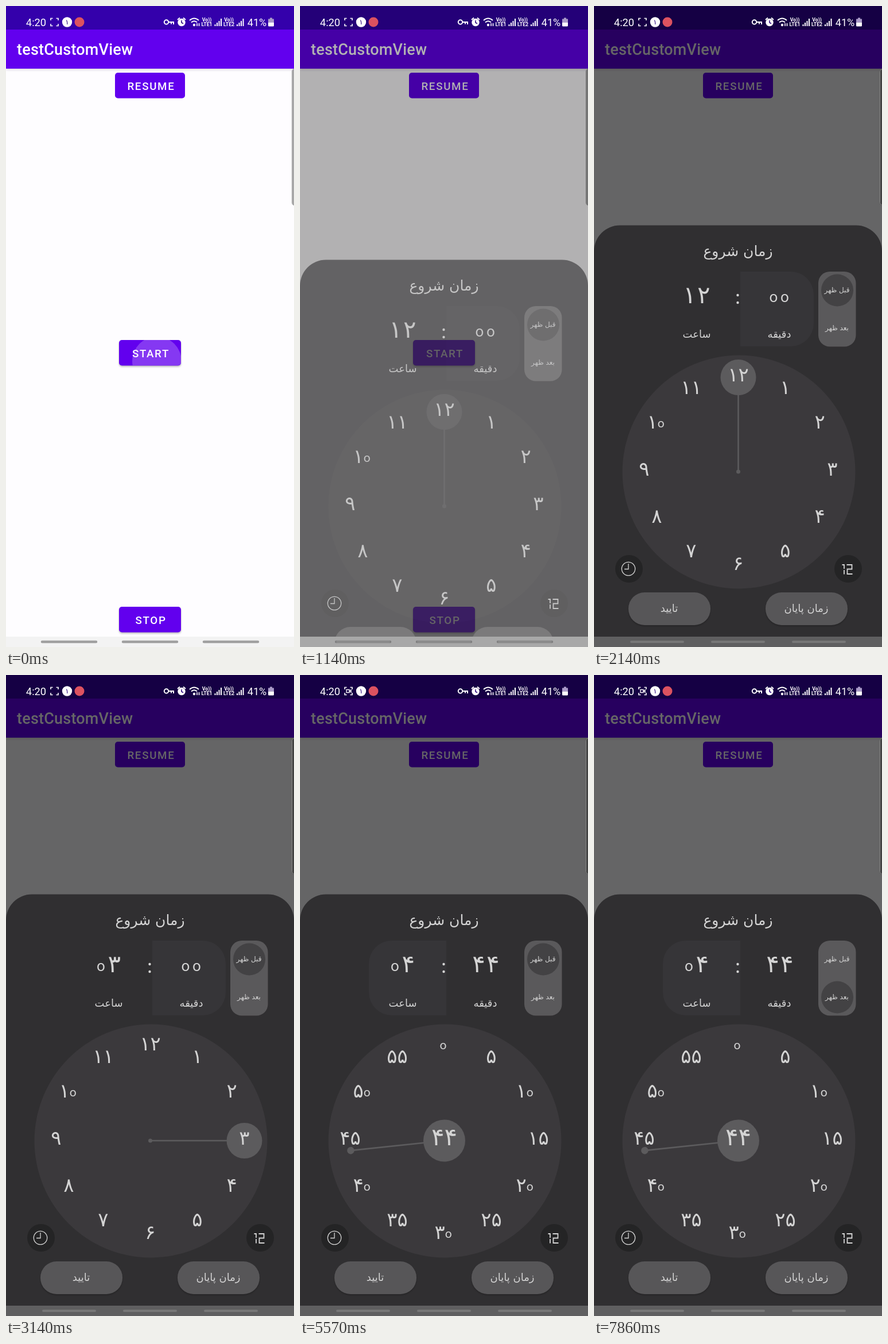
Animation of 502 by 1115 pixels, one loop 8000 ms. Source, as an HTML page:

```html
<!DOCTYPE html>
<html lang="fa">
<head>
<meta charset="utf-8">
<title>Time picker</title>
<style>
  html, body { margin: 0; height: 100%; overflow: hidden; background: #fefdff; }
  svg { display: block; width: 100%; height: 100%; }
  text { font-family: "DejaVu Sans", sans-serif; fill: #d4d4d4; text-anchor: middle; }
  .ui text { font-family: Roboto, sans-serif; font-weight: 500; fill: #fff; }
  .caps { font-size: 18.8px; letter-spacing: .0893em; }
  .btn { fill: #6200ee; }
  .raised { filter: drop-shadow(0 2px 1.5px #0004); }
  .status text { font-family: Roboto, sans-serif; fill: #fff; }
  .status .tiny { font-size: 8.7px; font-weight: 700; }
  .line { fill: none; stroke: #fff; stroke-width: 1.6; }
  .pill { fill: #575658; filter: drop-shadow(0 2px 1px #0003); }
  .face { fill: #3b393c; }
  .pane { fill: #363538; }
  .hand { fill: #5c5b5d; stroke: #5c5b5d; }
  .corner { fill: #242425; }
  .big { font-size: 42px; letter-spacing: .05em; }
  .mid { font-size: 18px; }
  .small { font-size: 12px; }
  #ring text { font-size: 34px; }
  .zero { font-family: Roboto, sans-serif; font-size: .62em; letter-spacing: .18em; baseline-shift: .08em; }
</style>
</head>
<body>
<svg viewBox="0 0 502 1115" preserveAspectRatio="none">
  <defs>
    <clipPath id="startClip"><rect x="197" y="581" width="108" height="44" rx="5"/></clipPath>
    <g id="bars"><path d="M0 35v-3M3.5 35v-6M7 35v-9M10.5 35v-13" stroke="#fff" stroke-width="2"/></g>
  </defs>

  <g class="ui">
    <rect width="502" height="1115" fill="#fefdff"/>
    <rect y="41" width="502" height="68" fill="#6200ee" style="filter:drop-shadow(0 2px 2px #0002)"/>
    <rect width="502" height="41" fill="#3400ab"/>
    <text x="19" y="85" style="text-anchor:start;font-size:27px;letter-spacing:.2px">testCustomView</text>
    <rect class="btn" x="190" y="116" width="122" height="44.5" rx="5"/>
    <text class="caps" x="253" y="146">RESUME</text>
    <rect class="btn raised" x="197" y="581" width="108" height="44.5" rx="5"/>
    <g clip-path="url(#startClip)"><circle id="ripple" cx="263" cy="618" fill="#fff"/></g>
    <text class="caps" x="252.5" y="610.5">START</text>
    <rect class="btn raised" x="197" y="1045" width="108" height="44.5" rx="5"/>
    <text class="caps" x="252.5" y="1075">STOP</text>
    <rect x="498" y="109" width="12" height="238" rx="5" fill="#a9a9a9"/>
  </g>

  <rect id="dim" width="502" height="1115"/>
  <rect id="edge" x="498.5" y="109.5" width="12" height="237" rx="5" fill="#444" stroke="#858585"/>

  <g id="sheet">
    <path d="M0 1400V426.500a45 45 0 0 1 45-45H457a45 45 0 0 1 45 45V1400z" fill="#302f31"/>
    <text x="251" y="435" font-size="25">زمان شروع</text>
    <g id="panels">
      <path id="hourPane" class="pane" d="M255 462H160a40 40 0 0 0-40 40v50a40 40 0 0 0 40 40h95z"/>
      <path id="minutePane" class="pane" d="M255 462h88a40 40 0 0 1 40 40v50a40 40 0 0 1-40 40h-88z"/>
      <circle class="face" cx="252.5" cy="810.5" r="203"/>
      <g id="hand" class="hand">
        <path d="M251.5 810V646" stroke-width="2.6"/>
        <circle id="tip" cx="251.5" cy="646" stroke="none"/>
      </g>
      <circle id="hub" class="hand" cx="251.5" cy="810" style="stroke:none"/>
      <circle class="corner" cx="61" cy="979" r="24"/>
      <circle class="corner" cx="443" cy="979" r="24"/>
    </g>
    <text id="hubText" x="251.5"></text>
    <g id="ring"></g>

    <text id="hour" class="big" x="180" y="517"></text>
    <circle cx="250.5" cy="503" r="2.2" fill="#d4d4d4"/>
    <circle cx="250.5" cy="516" r="2.2" fill="#d4d4d4"/>
    <text id="minute" class="big" x="325" y="517"></text>
    <text class="mid" x="179" y="577">ساعت</text>
    <text class="mid" x="323" y="577">دقیقه</text>

    <rect x="391" y="462" width="65.5" height="130.5" rx="20" fill="#5a595b"/>
    <circle id="thumb" cx="424" r="28" fill="#434244"/>
    <text class="small" x="423.5" y="498">قبل ظهر</text>
    <text class="small" x="423.5" y="563.5">بعد ظهر</text>

    <g fill="none" stroke="#d4d4d4" stroke-width="1.3">
      <circle cx="60" cy="979" r="11.7"/>
      <path d="M60 970v9.5h-7"/>
      <path d="M432.500 972h3.500v7M436 981v7.500M440.500 972h9v7.500h-8v8.500h9" stroke-width="1.8"/>
    </g>

    <rect class="pill" x="60" y="1020" width="143" height="57" rx="28"/>
    <rect class="pill" x="299" y="1020" width="143" height="57" rx="28"/>
    <text class="mid" x="131" y="1054">تایید</text>
    <text class="mid" x="370" y="1054">زمان پایان</text>
  </g>

  <g stroke="#a0a0a0" stroke-width="4.5" stroke-linecap="round">
    <rect y="1097" width="502" height="18" fill="#f3f3f3" stroke="none"/>
    <path d="M63 1106h94M204 1106h94M345 1106h94"/>
  </g>
  <g id="darkNav" stroke="#777" stroke-width="4" stroke-linecap="round">
    <rect y="1097" width="502" height="18" fill="#5f5f60" stroke="none"/>
    <path d="M65 1106h90M206 1106h90M347 1106h90"/>
  </g>

  <g class="status">
    <text x="52.5" y="35" font-size="18.3">4:20</text>
    <path class="line" d="M78 25v-3.5h3.5M87.5 21.5h3.5v3.5M91 31v3.5h-3.5M81.5 34.5h-3.5v-3.5"/>
    <path id="camera" class="line" d="M81 25.5h5v5h-5zM86 28l3-2v4z" style="stroke-width:1.3"/>
    <circle cx="106.5" cy="28" r="8.7" fill="#fff"/>
    <text x="106.5" y="32" font-size="12" style="font-family:'DejaVu Sans',sans-serif;fill:#26007c">۱</text>
    <circle cx="128" cy="28" r="8.5" fill="#dc5260"/>
    <g class="line" style="stroke-width:2">
      <circle cx="279.5" cy="28" r="3.7"/>
      <path d="M283 28h9v4M288 28v3.5"/>
      <path d="M299 24l4-3.5M313 24l-4-3.5"/>
      <path d="M320 25q8-7 16 0M323 28.5q5-4.5 10 0" stroke-width="1.8"/>
    </g>
    <circle cx="306" cy="28.5" r="6.7" fill="#fff"/>
    <path d="M306 25v4l3 1.5" fill="none" stroke="#26007c" stroke-width="1.5"/>
    <circle cx="328" cy="33" r="2.2" fill="#fff"/>
    <path d="M333 30v5M336.5 30v5" class="line"/>
    <text class="tiny" x="350" y="26.5">Vo))</text>
    <text class="tiny" x="350" y="35">LTE1</text>
    <use href="#bars" x="364.5"/>
    <text class="tiny" x="388.5" y="26.5">Vo))</text>
    <text class="tiny" x="388.5" y="35">LTE2</text>
    <use href="#bars" x="403"/>
    <text x="437.5" y="35" font-size="18">41%</text>
    <path d="M457 22.5h3v-2h4v2h3v6h-10z" fill="#a99ac8"/>
    <path d="M457 28.5h10v5.500q0 1.5-1.5 1.5h-7q-1.5 0-1.5-1.5z" fill="#fff"/>
  </g>
</svg>

<script>
const LOOP = 8000, RATE = 7 / 1000;
const $ = id => document.getElementById(id);
const set = (id, attrs) => Object.entries(attrs).forEach(([k, v]) => $(id).setAttribute(k, v));
const clamp = x => Math.max(0, Math.min(1, x));
const smooth = x => (1 - Math.cos(Math.PI * clamp(x))) / 2;
const ramp = (step, from, to) => smooth((step - from) / (to - from));

// Zero is set as a small open ring, the other digits in Persian form.
const persian = (n, pad = 1) => String(n).padStart(pad, '0').replace(/\d/g, d =>
  d === '0' ? '<tspan class="zero">o</tspan>' : String.fromCharCode(0x6f0 + +d));

const numerals = Array.from({ length: 12 }, (_, i) => {
  const label = document.createElementNS('http://www.w3.org/2000/svg', 'text');
  const a = i * Math.PI / 6;
  label.setAttribute('x', 251.5 + 164 * Math.sin(a));
  label.setAttribute('y', 817 - 164 * Math.cos(a));
  $('ring').append(label);
  return label;
});

function drawEntrance(step) {
  const fade = clamp(1 - (step - 2) / 4);
  set('ripple', { r: 43 + 45 * Math.min(step, 2), opacity: 0.22 * fade });

  // The sheet rises and fades in over two steps.
  const alpha = step < 7 ? 0 : step === 7 ? 0.025 : step === 8 ? 0.6 : 1;
  const lift = step <= 7 ? 206 : step === 8 ? 60 : 0;
  const dim = step < 8 ? 0 : step === 8 ? 0.5 : 1;
  set('sheet', { opacity: alpha, transform: `translate(0 ${lift})` });
  set('dim', { opacity: 0.6 * dim });
  set('darkNav', { opacity: dim });
  set('edge', { opacity: step > 9 ? 1 : 0 });
  set('panels', { opacity: clamp(0.6 + (step - 9) * 0.15) });
}

function drawClock(step) {
  const minuteMode = step >= 29;
  const hours = Math.round(4 * ramp(step, 16, 24));
  const morph = minuteMode ? smooth((step - 28.2) * 2 / 7) : 0;
  const minutes = Math.round(44 * ramp(step, 32, 38.5));
  const angle = minuteMode ? 120 * (1 - morph) + minutes * 6 : hours * 30;
  const hubRadius = minuteMode ? 3.5 + 33 * morph : 3.5;
  const textScale = minuteMode ? hubRadius / 36.5 : 0;

  set('hand', { transform: `rotate(${angle} 251.5 810)` });
  set('tip', { r: minuteMode ? 6.3 : 31 });
  set('hub', { r: hubRadius });
  set('hubText', { y: 810 + 8 * textScale, 'font-size': 42 * textScale });
  $('hubText').innerHTML = minuteMode ? persian(Math.floor(angle / 6 + 0.001)) : '';
  $('hour').innerHTML = persian(hours || 12, 2);
  $('minute').innerHTML = persian(minutes, 2);
  set('hourPane', { opacity: minuteMode ? 1 : 0 });
  set('minutePane', { opacity: minuteMode ? 0 : 1 });
  numerals.forEach((label, i) => {
    label.innerHTML = persian(minuteMode ? i * 5 : i || 12);
  });
}

function render() {
  const time = performance.now() % LOOP;
  const step = Math.floor((time + 4) * RATE) % 56;
  drawEntrance(step);
  drawClock(step);
  set('thumb', { cy: 494.5 + 66 * ramp(step, 46, 49) });
  set('camera', { opacity: step % 7 >= 4 ? 1 : 0 });
  requestAnimationFrame(render);
}
render();
</script>
</body>
</html>
```
